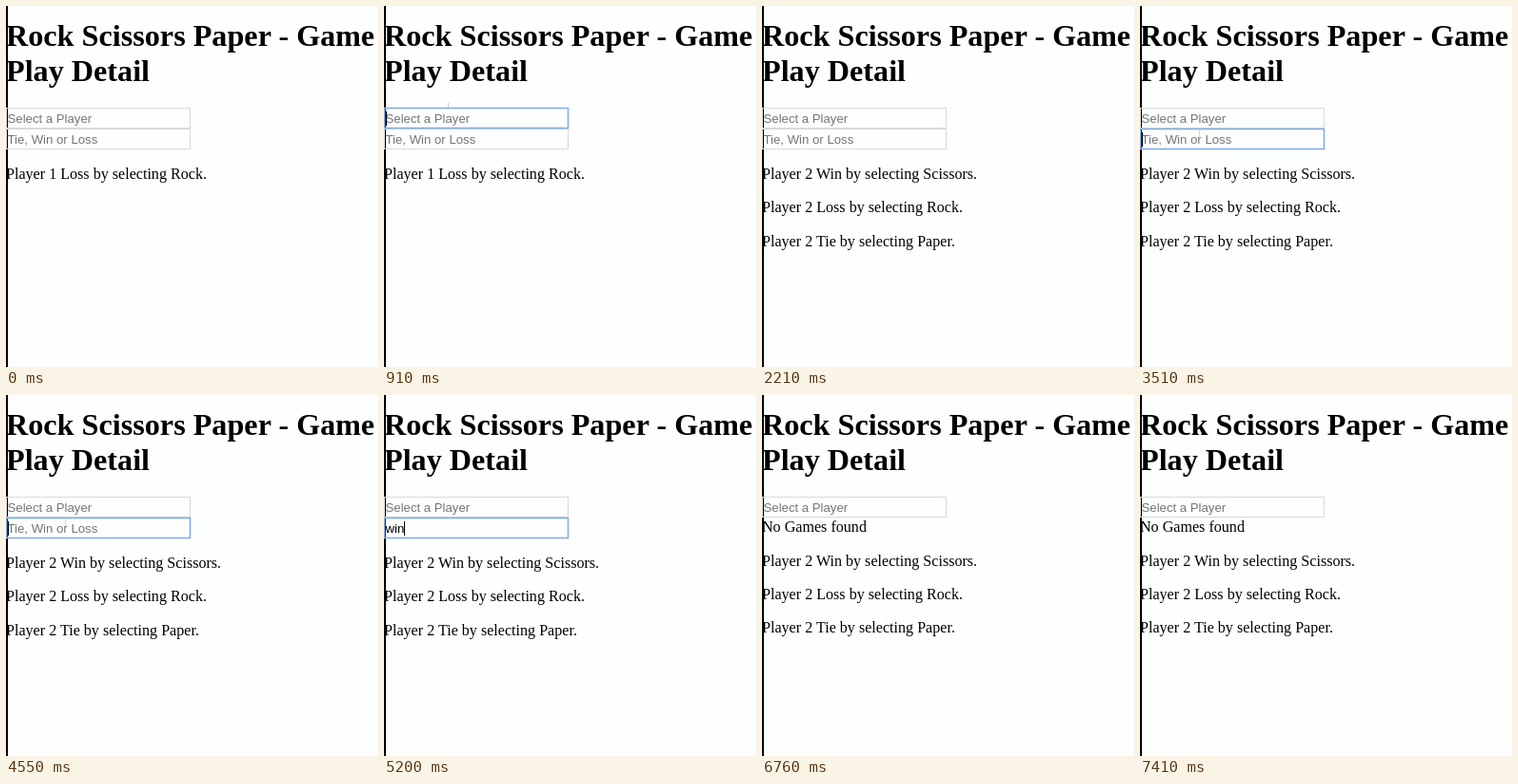
Recreate the animation shown at these times as an HTML page. Size 391x380 px, loop 7930 ms.

```html
<!DOCTYPE html>
<html lang="en">
<head>
<meta charset="utf-8">
<title>Game Play Detail</title>
<style>
  html, body { margin: 0; width: 100%; height: 100%; overflow: hidden; background: #fdfefe; }
  svg { display: block; }
  text { font: 16.1px "Liberation Serif", "Times New Roman", serif; white-space: pre; }
  .title { font-size: 32.2px; font-weight: bold; }
  .input { font: 13.2px "Liberation Sans", Arial, sans-serif; }
  .hint { fill: #757575; }
  .field { fill: none; stroke: #d8dada; }
  .focus { stroke: #84abe6; stroke-width: 1.6; }
  .pointer { stroke: #c9cdce; fill: none; }
</style>
</head>
<body>
<svg id="stage" width="391" height="380" viewBox="0 0 391 380"></svg>
<script>
const LOOP = 7930;
const stage = document.getElementById('stage');
const measure = document.createElement('canvas').getContext('2d');
measure.font = '13.2px "Liberation Sans", Arial, sans-serif';

const text = (x, y, str, cls = '') => `<text x="${x}" y="${y}" class="${cls}">${str}</text>`;

function field(y, hint, value, focused, caret) {
  const frame = `<rect x="0.5" y="${y}.5" width="193" height="21" class="field${focused ? ' focus' : ''}"/>`;
  const label = text(1.5, y + 16, value || hint, value ? 'input' : 'input hint');
  const x = Math.round(1.5 + measure.measureText(value).width);
  return frame + label + (caret ? `<rect x="${x}" y="${y + 4}" width="1" height="15"/>` : '');
}

// Thin text pointer; x, y is its lower end.
const pointer = (x, y, h, alpha = 1) =>
  `<path class="pointer" opacity="${alpha}" d="M${x + .5} ${y - h}v${h}"/>`;

// Hold the pointer on discrete steps while it travels.
function travel(t, start, steps, from, to) {
  const k = Math.min(1, Math.max(0, (Math.floor((t - start) / 130) + 1) / steps));
  return from.map((v, i) => Math.round(v + (to[i] - v) * k));
}

function drawPointer(t) {
  if (t >= 260 && t < 1820) {
    const [x, y] = travel(t, 260, 4, [73, 107], [67, 107]);
    return pointer(x, y, 5);
  }
  if (t >= 2860 && t < 4810) {
    const [x, y] = travel(t, 2860, 4, [61, 124], [62, 138]);
    return pointer(x, y, 7, .8);
  }
  if (t >= 6500 && t < 7410) {
    const [x, y] = travel(t, 6500, 7, [63, 139], [219, 374]);
    return pointer(x, y, 5, .25);
  }
  return '';
}

function typed(t) {
  return 'win'.slice(0, t < 4810 ? 0 : t < 4940 ? 1 : t < 5200 ? 2 : 3);
}

function scene(t) {
  const filtered = t >= 2210;
  const empty = t >= 5720;
  const onPlayer = t >= 910 && !filtered;
  const onResult = t >= 3510 && !empty;
  const playerCaret = onPlayer && (t < 1430 || t >= 1820);
  const resultCaret = onResult && (t < 4030 || t >= 4550);
  const player = onPlayer && t >= 1820 ? '2' : '';
  const games = filtered
    ? ['2 Win by selecting Scissors.', '2 Loss by selecting Rock.', '2 Tie by selecting Paper.']
    : ['1 Loss by selecting Rock.'];

  const first = field(107, 'Select a Player', player, onPlayer, playerCaret);
  const second = empty
    ? text(0, 144, 'No Games found')
    : field(129, 'Tie, Win or Loss', typed(t), onResult, resultCaret);

  return '<rect width="2" height="380"/>'
    + text(0, 41.5, 'Rock Scissors Paper - Game', 'title')
    + text(0, 79, 'Play Detail', 'title')
    + (onPlayer ? second + first : first + second)
    + games.map((g, i) => text(0, (empty ? 179.6 : 182) + i * 35.3, 'Player ' + g)).join('')
    + drawPointer(t);
}

let shown = '';
function tick() {
  const next = scene(performance.now() % LOOP);
  if (next !== shown) stage.innerHTML = shown = next;
  requestAnimationFrame(tick);
}
tick();
</script>
</body>
</html>
```
